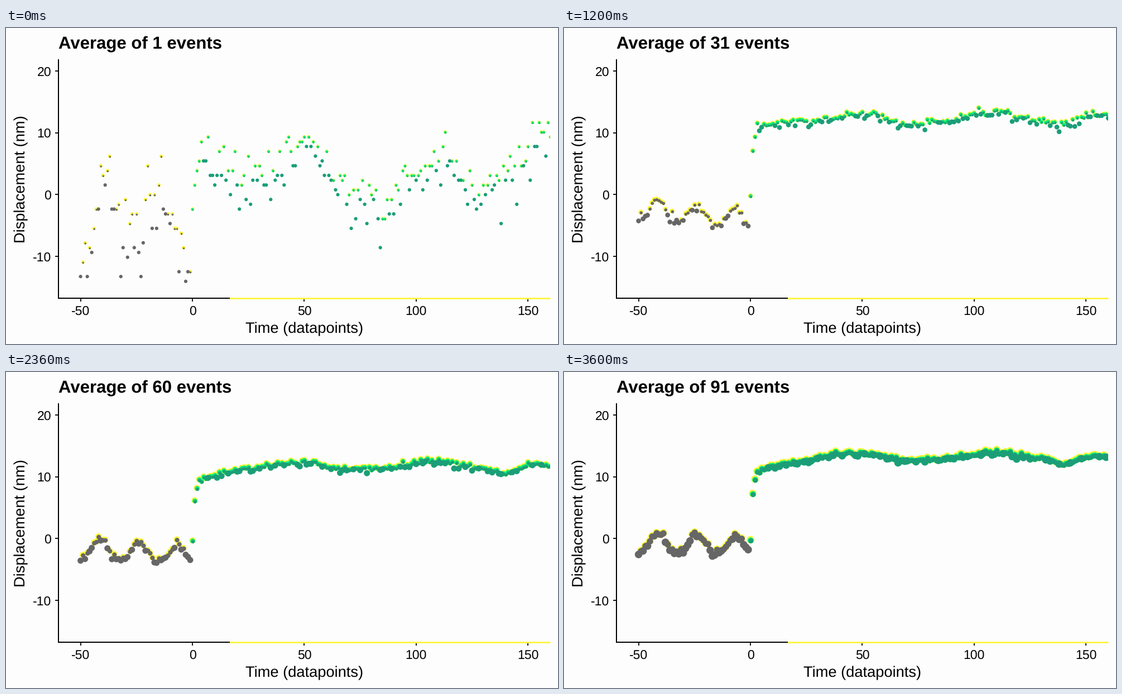
These frames come from a looping animation (989x566 px, 3640 ms). A matplotlib script:

```python
import numpy as np
import matplotlib.pyplot as plt
from matplotlib.animation import FuncAnimation

W, H, DPI = 989, 566, 100
PX = 72 / DPI                      # points per pixel
LEFT, RIGHT, TOP, BOTTOM = 94, 975, 57, 484
X0, SX = 334, 4.008                # pixel of time 0, pixels per datapoint
Y0, SY = 298.5, 11.06              # pixel of 0 nm, pixels per nm
EVENTS = 91
RESOLUTION = 0.78                  # nm, detector step

PAPER, INK = "#fdfdfe", "#000000"
GREY, TEAL = "#666666", "#1b9e77"
YELLOW, GREEN = "#fdf63c", "#10ee76"

plt.rcParams["font.family"] = "Liberation Sans"
plt.rcParams["text.hinting"] = "none"

time = np.arange(-50, 161)
before = time < 0
onset = (time >= 0) & (time <= 2)


def wave(peak, period):
    return np.cos(2 * np.pi * (time - peak) / period)


def first_event():
    pre = -5.5 + 6 * wave(-39, 24)
    post = 2.5 + 4 * wave(53, 54) + 2.5 * wave(30, 120)
    rise = 1 - np.exp(-0.6 * np.maximum(time, 0))
    return np.where(before, pre, -2 + (post + 2) * rise)


def typical_event(n):
    """Settled trace: a wavy baseline, then a fast step and a slow climb."""
    tilt = 0.14 * np.exp(-n / 30)
    pre = -4 + 3 * n / EVENTS - tilt * (time + 25) + 1.5 * wave(-42, 18)
    after = np.maximum(time, 0)
    level = 12.6 + 0.8 * np.cos(2 * np.pi * (n - 12) / 80)
    slow = 3 * min(1, n / 40)
    ripple = 0.6 * wave(42, 66) * (1 - np.exp(-after / 10))
    post = (level - slow) * (1 - np.exp(-1.2 * after))
    post += slow * (1 - np.exp(-after / 14)) + ripple
    return np.where(before, pre, post)


def running_means():
    """Average trace after each event, from sums of noisy single events."""
    rng = np.random.default_rng(21)
    n = np.arange(1, EVENTS + 1)[:, None]
    typical = np.array([typical_event(k) for k in n[:, 0]])
    sums = (n - 1) * typical + first_event()
    events = np.diff(sums, axis=0, prepend=0)

    knots = np.linspace(-50, 160, 22)
    drift = np.array([np.interp(time, knots, rng.normal(0, 1.8, knots.size))
                      for _ in range(EVENTS)])
    drift[0] = 0
    spread = np.where(before, 3.1, 2.4) * ~onset
    events += drift + spread * rng.normal(size=events.shape)
    events = np.round(events / RESOLUTION) * RESOLUTION
    return np.cumsum(events, axis=0) / n


def local_mean(y):
    padded = np.pad(y, 2, mode="edge")
    return np.convolve(padded, np.ones(5) / 5, mode="valid")


means = running_means()

fig = plt.figure(figsize=(W / DPI, H / DPI), dpi=DPI, facecolor=PAPER)
ax = fig.add_axes([LEFT / W, 1 - BOTTOM / H, (RIGHT - LEFT) / W, (BOTTOM - TOP) / H],
                  facecolor=PAPER)
x_min, x_max = (LEFT - X0) / SX, (RIGHT - X0) / SX
y_min, y_max = (Y0 - BOTTOM) / SY, (Y0 - TOP) / SY
ax.set_xlim(x_min, x_max)
ax.set_ylim(y_min, y_max)
ax.set_xticks(range(-50, 151, 50), [str(v) for v in range(-50, 151, 50)])
ax.set_yticks(range(-10, 21, 10), [str(v) for v in range(-10, 21, 10)])
ax.tick_params(length=6 * PX, width=1.8 * PX, labelsize=23 * PX, pad=7 * PX, color=INK)
ax.spines[["top", "right"]].set_visible(False)
ax.spines[["left", "bottom"]].set_linewidth(2 * PX)
x_split = (400 - X0) / SX
ax.spines["bottom"].set_bounds(x_min, x_split)
ax.plot([x_split, x_max], [y_min, y_min], color=YELLOW, lw=2.8 * PX,
        clip_on=False, solid_capstyle="butt")


def label(x, y, text, size, **kw):
    return fig.text(x / W, 1 - y / H, text, fontsize=size * PX, color=INK,
                    va="baseline", **kw)


title = label(94.5, 37, "", 31.2, weight="bold")
label(534.5, 546.5, "Time (datapoints)", 27.2, ha="center")
label(34, 270.5, "Displacement (nm)", 27.2, ha="center", rotation=90,
      rotation_mode="anchor")


def dots(pre, post, z):
    return ax.scatter(time, means[0], c=np.where(before, pre, post),
                      linewidths=0, zorder=z)


rim = dots(YELLOW, YELLOW, 3)
glow = dots(YELLOW, GREEN, 4)
body = dots(GREY, TEAL, 5)


def place(layer, y, diameter, scale):
    """Shrink each dot towards the lower right edge of its full disc."""
    gap = diameter * (1 - scale) / 2
    layer.set_offsets(np.column_stack([time + 0.4 * gap / SX, y - 0.9 * gap / SY]))
    layer.set_sizes((diameter * scale * PX) ** 2)


def draw(i):
    y = means[i]
    d = 6.2 + 0.081 * i
    trend = np.concatenate([local_mean(y[before]), local_mean(y[~before])])
    lit = (y > trend - 0.1) | onset
    core = 0.1 + 0.04 * d + np.where(before, 0.2, 0)
    place(rim, y, d * lit, 1)
    place(glow, y, d * lit, 0.8)
    place(body, y, d, np.where(lit, core, 1))
    title.set_text(f"Average of {i + 1} events")
    return rim, glow, body, title


anim = FuncAnimation(fig, draw, frames=EVENTS, interval=40, repeat=True,
                     repeat_delay=0, blit=False)
plt.show()
```
